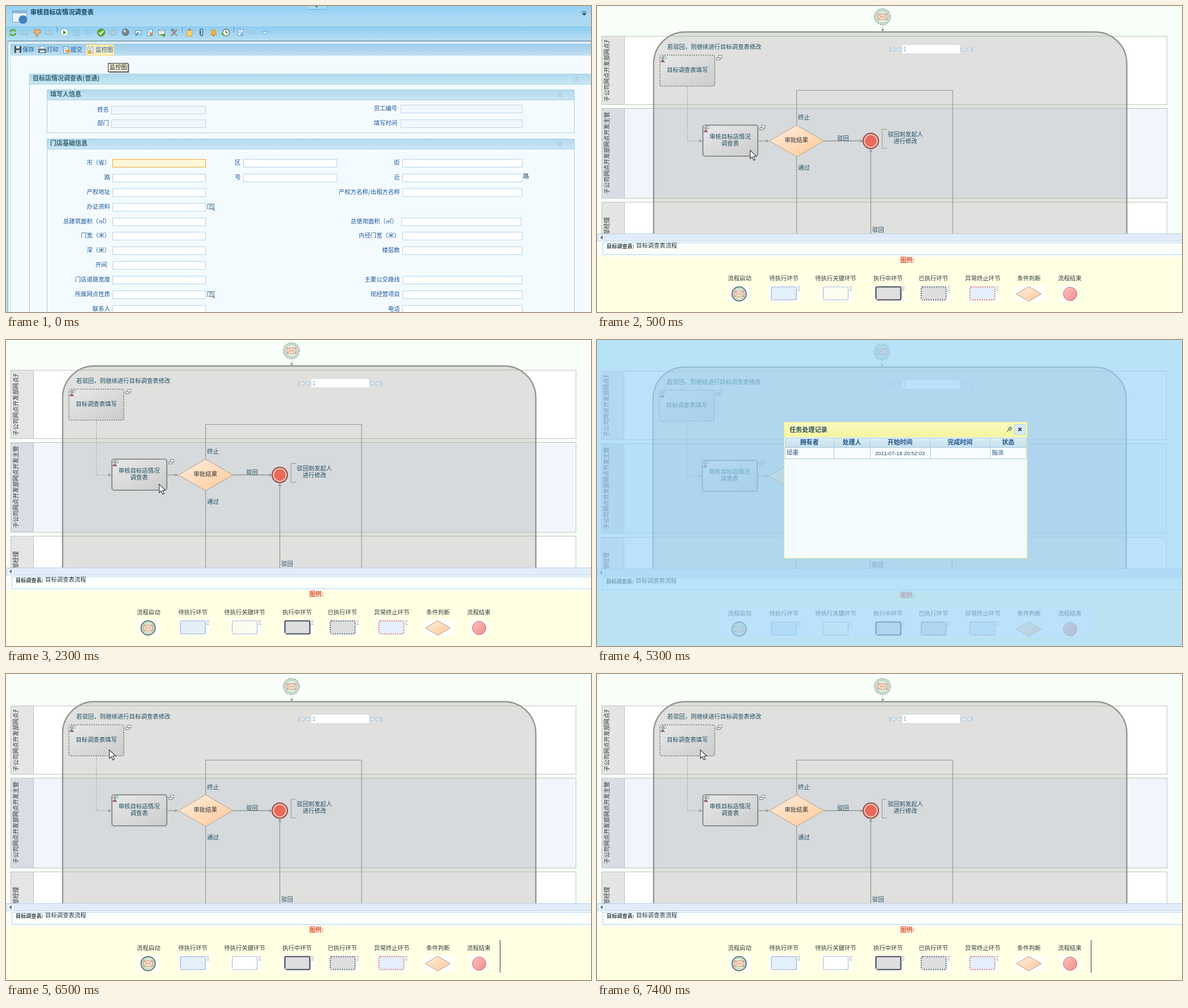
An HTML page for the animation above (8000 ms loop, 1033 px wide and 542 px high).

```html
<!DOCTYPE html>
<html lang="zh-CN">
<head>
<meta charset="utf-8">
<title>审核流程</title>
<style>
html, body { margin: 0; width: 100%; height: 100%; overflow: hidden; background: #f4fbff; }
svg { display: block; }
text { font-family: "Noto Sans CJK SC", "Noto Sans CJK", "Noto Sans CJK JP", sans-serif; font-size: 10.4px; white-space: pre; }
.arial { font-family: "Liberation Sans", Arial, sans-serif; }
</style>
</head>
<body>
<svg id="stage" width="1033" height="542" viewBox="0 0 1033 542" xmlns="http://www.w3.org/2000/svg">
<defs id="defs"></defs>
</svg>
<script>
const STAGE = document.getElementById('stage');

// Basic shapes
const rect = (x, y, w, h, fill, stroke = 'none', extra = '') =>
  `<rect x="${x}" y="${y}" width="${w}" height="${h}" fill="${fill}" stroke="${stroke}" ${extra}/>`;
const box = (x, y, w, h, fill, stroke, extra) => rect(x + .5, y + .5, w, h, fill, stroke, extra);
const path = (d, stroke, fill = 'none', w = 1, extra = '') =>
  `<path d="${d}" stroke="${stroke}" fill="${fill}" stroke-width="${w}" ${extra}/>`;
const circle = (x, y, r, fill, stroke = 'none', w = 1, extra = '') =>
  `<circle cx="${x}" cy="${y}" r="${r}" fill="${fill}" stroke="${stroke}" stroke-width="${w}" ${extra}/>`;
const group = (x, y, body) => `<g transform="translate(${x} ${y})">${body}</g>`;
// y is the middle of the line of text
const text = (s, x, y, fill = '#1d4e74', extra = '', size = 10.4) =>
  `<text x="${x}" y="${y + size * .38}" fill="${fill}" style="font-size:${size}px" ${extra}>${s}</text>`;
const bold = (s, x, y, fill, size = 11.1, extra = '') => text(s, x, y, fill, 'font-weight="700" ' + extra, size);
const END = 'text-anchor="end"', MID = 'text-anchor="middle"';
const DOTS = 'stroke-dasharray="2 2"';

const gradient = (id, stops, diagonal) =>
  `<linearGradient id="${id}" x1="0" y1="0" x2="${diagonal ? 1 : 0}" y2="1">` +
  stops.map((c, i) => `<stop offset="${i / (stops.length - 1)}" stop-color="${c}"/>`).join('') + '</linearGradient>';

document.getElementById('defs').innerHTML =
  gradient('head', ['#94d0f3', '#a6d9f5', '#aedaf2']) +
  gradient('tools', ['#8dccf0', '#b6dff3']) +
  gradient('bar', ['#9dcce8', '#c0e1f3']) +
  gradient('panel', ['#b3d9ee', '#c8e6f6']) +
  gradient('task', ['#e8e8e8', '#d9dad9', '#cbcccb'], true) +
  gradient('peach', ['#fff0e0', '#ffc797'], true) +
  gradient('pink', ['#fbc4c0', '#f28b86'], true) +
  gradient('yellow', ['#fbfac2', '#f4f49c']) +
  gradient('th', ['#dceff7', '#c6deec']);

// Form page
const page = (x, y, c = '#5a93c0') =>
  box(x - 5, y - 6, 9, 11, '#f8fcff', c) + path(`M${x - 3} ${y - 2.5}h5m-5 3h5`, c);

function toolIcons() {
  const y = 47, faint = '#8db9d2';
  const doc = (x, mark) => page(x, y) + rect(x, y, 5, 5, mark);
  const ghost = x => box(x - 6, y - 4, 9, 7, '#aad3ea', faint) + circle(x + 4, y + 3, 3, '#9fcae2');
  return path('M7.5 46a5 5 0 0 1 9-2M17 48a5 5 0 0 1-9 2', '#5ea51f', 'none', 2.4) +
    path('M17.5 40.5v5h-5zM6.5 53.5v-5h5z', 'none', '#72b82c') +
    ghost(33) + ghost(76) +
    path('M50 42h8l3 2v4h-4l-1 6h-3v-6h-4z', '#b5804a', '#f3b06a') +
    circle(103, y, 6.5, '#f5fbff', '#86a9b8') + path('M101 43l5.5 4-5.5 4z', 'none', '#45a51d') +
    circle(125, y, 5.5, 'none', faint) + path('M123.5 44.5v5m3-5v5', faint) +
    path('M142 43l5 4-5 4zM149.5 42.5v9', faint) +
    circle(168, y, 6.5, '#5fae2a', '#3f861b') + path('M164.5 47l2.5 3 5-6', '#fff', 'none', 2) +
    circle(189, y, 5.5, '#a8c8da', faint) + circle(189, y, 2, '#c5cfd8') +
    circle(211, 46.5, 6, '#7b8588', '#59656b') + circle(209.5, 44.5, 2.5, '#c4cccc') +
    box(228, 43, 10, 7, '#e7f4fd', '#4a8dc5') + path('M229 52l5-5', '#2c79bc', 'none', 2) +
    doc(254, '#d88a4c') +
    box(269, 42, 11, 8, '#f7fcff', '#7396ab') + path('M269.5 42.5l5.5 4 5.5-4', '#7396ab') +
    path('M274 50h4v-2.5l4 4-4 4v-2.5h-4z', 'none', '#53a52b') +
    path('M292 42l10 11', '#8c98a0', 'none', 2.2) + path('M302 42l-10 11', '#c1684a', 'none', 2) +
    path('M291 43l4-2 2 3', '#6f7e88', 'none', 2) +
    box(319, 42, 9, 11, '#fbd06a', '#d2a140') + rect(322, 40, 4, 4, '#7d9aae') +
    path('M343.5 44v7a2 2 0 0 0 4 0v-8a2.5 2.5 0 0 0-5 0v8', '#4d5a62', 'none', 1.2) +
    path('M361 51l2-3v-3a3.5 3.5 0 0 1 7 0v3l2 3z', '#d98b1e', '#fbb23c') + circle(366.5, 52.5, 1.5, '#c67818') +
    circle(388.5, y, 6, '#f3f8ea', '#5f7f68', 1.5) + path('M388.5 43.5v4h3', '#444', 'none', 1.2) +
    path('M381 48l4 4', '#60a72c', 'none', 2.5) +
    doc(414, '#88b6da') +
    path('M430 49l6-5 6 5z', '#8dbfe0', '#a4d2ee') + path('M452 45h11l-5.5 6z', '#5e9ccc', '#d3ecfb') +
    [90, 311, 402].map(x => path(`M${x + .5} 37v10`, '#5f91ad')).join('');
}

function formPage() {
  const ink = '#1c57a0';
  const fieldLook = {
    on: ['#fff', '#b3d3ec'],
    off: ['#f1f8fe', '#bcd2e8'],
    focus: ['#fff6d6', '#eaa43c']
  };
  const field = (x, y, w, look = 'on') => box(x, y, w, 14, ...fieldLook[look]);
  const chevron = (x, y) => path(`M${x - 4} ${y}l4-4 4 4m-8 4l4-4 4 4`, '#a2adb5');
  const panel = (x, y, w, h, title, chX) =>
    box(x, y, w, h, '#f4fbff', '#a6cfe6') + rect(x + 1, y + 1, w - 1, 17, 'url(#panel)') +
    path(`M${x} ${y + 18.5}h${w}`, '#a6cfe6') +
    bold(title, x + 6, y + 8, '#39636f', 11) + chevron(chX, y + 10);
  const lens = (x, y) => box(x, y, 12, 9, '#f5fbff', '#7297b2') + rect(x, y, 13, 2.5, '#88aac4') +
    circle(x + 7.5, y + 6.5, 3, '#d8eefb', '#496f8b') + path(`M${x + 10} ${y + 9}l3.5 3.5`, '#496f8b', 'none', 1.6);

  const rows = [
    ['市（省）', '街'], ['路', '近'], ['产权地址', '产权方名称/出租方名称'], ['办证资料', ''],
    ['总建筑面积（㎡）', '总使用面积（㎡）'], ['门宽（米）', '内径门宽（米）'], ['深（米）', '楼层数'],
    ['开间', ''], ['门店道路宽度', '主要公交路线'], ['所属网点性质', '现经营项目'], ['联系人', '电话']
  ];
  let s = rect(0, 0, 1033, 542, '#f4fbff') + rect(0, 0, 1033, 36, 'url(#head)') +
    rect(0, 36, 1033, 25, 'url(#tools)') +
    rect(0, 61, 1033, 2, '#84a7b8') + rect(0, 63, 1033, 4, '#d9edf7') +
    rect(0, 61, 4, 481, '#b1daef') + path('M3.5 62v480', '#8eb0c1') + path('M7.5 67v475', '#c4e0ee') +
    rect(8, 67, 1025, 21, 'url(#bar)') +
    path('M530 0v4q0 2 2 2h33q2 0 2-2v-4', '#61afe0', '#a9daf5') + path('M546 0h5l-2.5 3z', 'none', '#456f88') +
    path('M1016.5 10.5h8', '#20384a') + path('M1017 13h8l-4 4z', 'none', '#20384a') +
    box(11, 8, 25, 20, '#e9f5fc', '#79a6c6') + rect(12, 9, 24, 4, '#8cb9dc') + circle(30, 24, 7.5, '#3f83bd') +
    bold('审核目标店情况调查表', 43, 11, '#173f5f', 11.2) + toolIcons();

  s += box(15, 71, 11, 11, '#4a5964', '#35434d') + rect(18, 71, 6, 4, '#e5edf2') + rect(18, 78, 6, 5, '#cbd8e0') +
    text('保存', 29, 77, ink) +
    rect(60, 71, 8, 5, '#fff', '#7890a0') + box(57, 76, 13, 6, '#71818d', '#4e606d') + rect(60, 79, 8, 3, '#e7f1f7') +
    text('打印', 72, 77, ink) +
    page(106, 78) + path('M105 78h4v-3l5 5-5 5v-3h-4z', 'none', '#f09a3b') + text('提交', 114, 77, ink) +
    box(141, 68, 49, 19, '#feeebb', '#f4d684') + page(149, 78, '#6ea0c2') + rect(144, 79, 7, 4, '#f0b252') +
    text('监控图', 158, 77, ink);

  s += panel(41, 120, 1000, 440, '目标店情况调查表(普通)', 1008) +
    panel(72, 148, 931, 76, '填写人信息', 978) + panel(72, 235, 931, 330, '门店基础信息', 978);
  s += text('姓名', 182, 183, ink, END) + field(186, 177, 166, 'off') +
    text('部门', 182, 207.5, ink, END) + field(186, 201, 166, 'off') +
    text('员工编号', 691, 181.5, ink, END) + field(697, 175, 214, 'off') +
    text('填写时间', 691, 207.5, ink, END) + field(697, 201, 214, 'off');

  rows.forEach(([left, right], i) => {
    const y = Math.round(271.3 + i * 25.82), nudge = i === 4 ? 2 : 0;
    s += text(left, i === 7 ? 178.5 : 184, y + 6, ink, END) + field(188, y, 164, i ? 'on' : 'focus');
    if (right) s += text(right, 695.5 - nudge * 2, y + 6, ink, END) + field(700 - nudge, y, 211);
    if (i < 2) s += text('区号'[i], 414.5, y + 6, ink, END) + field(419, y, 165);
    if (i === 3 || i === 9) s += lens(355, y + 1);
  });
  return s + text('路', 913, 301, '#173f5f') +
    rect(182, 103, 36, 16, '#a9b7bd') + box(180, 101, 35, 15, '#ffffe6', '#222') + text('监控图', 182.5, 108.5, '#111');
}

// Flow chart
const envelope = (x, y) => rect(x - 8, y - 5, 16, 10, '#f6e3cd', '#cf8b70') +
  path(`M${x - 8} ${y - 5}l8 6 8-6m-16 10l6-5.5m10 5.5l-6-5.5`, '#cf8b70');
const diamond = (x, y, w, h) => path(`M${x - w} ${y}L${x} ${y - h}L${x + w} ${y}L${x} ${y + h}z`, '#ad9c88', 'url(#peach)');

function flowTop() {
  const line = '#939893', ink = '#1d4e62';
  const lane = (y, h, fill, head) => box(8, y, 998, h, fill, '#bcc4b8') + box(8, y, 40, h, head, '#bcc4b8');
  const upward = (s, y, extra = '') => `<g transform="translate(17 ${y}) rotate(-90)">${text(s, 0, 0, '#333', extra)}</g>`;
  const task = (x, y, dotted) =>
    rect(x, y, 97, 55, 'url(#task)', '#8d918d', `rx="4" stroke-width="2.2" ${dotted ? DOTS : ''}`) +
    rect(x + 2, y + 1, 10, 10, '#f1f4f4') + path(`M${x + 5} ${y + 2}h6v5h-4`, '#6aa3d2', '#d8ecfa') +
    circle(x + 5, y + 5, 2.2, '#f0c3a0', '#5b4a40', .8) + path(`M${x + 1.5} ${y + 12}q3.5-7 7 0z`, '#b9483f', '#4e82b2') +
    box(x + 103, y, 6, 5, '#eef3f3', '#7e8a8a') + box(x + 100, y + 4, 6, 4, '#dde6e8', '#7e8a8a');
  const arrow = (x, y, turn = 0) =>
    `<path transform="translate(${x} ${y}) rotate(${turn})" d="M0 0l-6-3 1.5 3-1.5 3z" fill="${line}"/>`;
  const step = (x, dir) =>
    path(`M${x} 75h${dir * 3}v-2l${dir * 5} 4 ${dir * -5} 4v-2h${dir * -3}z`, '#a5c8e2', '#e3eef3');

  return `<svg width="1040" height="403" overflow="hidden">` +
    lane(53, 121, '#fff', '#e5e5e5') + lane(181, 159, '#f0f6fb', '#d9dee6') + lane(347, 120, '#fff', '#e5e5e5') +
    `<svg y="60" width="48" height="343" overflow="hidden">` +
    group(0, -60, upward('子公司网点开发部网点开', 169.5) + upward('子公司网点开发部网点开发主管', 333) + upward('部经理', 374, END)) +
    '</svg>' +
    rect(100, 46, 835.5, 600, 'rgba(165,165,160,.35)', '#929792', 'rx="56" stroke-width="2.4"') +
    circle(504, 19, 14, '#d3e9dc', '#84a093', 2, DOTS) + circle(504, 19, 11, '#e1eee0', '#a6beb0') + envelope(504, 19) +
    path('M504.5 33v9', line, 'none', 1, DOTS) + arrow(504.5, 46, 90) +
    text('若驳回，则继续进行目标调查表修改', 124, 72, ink) +
    step(527.5, -1) + step(537, -1) + step(643.5, 1) + step(653, 1) +
    path('M517.5 72v10M662.5 72v10', '#9bb4c4') +
    box(538, 68, 103, 16, '#fff', '#d0dde2') + text('1', 541, 76.5, '#a0a0a0', 'class="arial"', 10) +
    task(111, 87, true) + text('目标调查表填写', 159.5, 113, ink, MID) +
    path('M159.5 143v96h22', line, 'none', 1, DOTS) + arrow(186, 239) +
    task(187, 211) + text('审核目标店情况', 235, 231, ink, MID) + text('调查表', 235, 243, ink, MID) +
    path('M285 239h16', line, 'none', 1.3) + arrow(304, 239) +
    path('M352.5 211v-61.5h275.5v260M352.5 266v140', line, 'none', 1.2) +
    diamond(352.5, 239, 48, 28) + text('审批结果', 352, 237, '#333', MID) +
    path('M401 239h65', line, 'none', 1.3) + arrow(470, 239) +
    path('M483.5 406v-150', line, 'none', 1.3) + arrow(483.5, 253, -90) +
    circle(483.5, 239, 13.5, '#f9bdb0', '#8f4a46', 2) + circle(483.5, 239, 9.5, '#ea6a5c', '#d8564c') +
    path('M512 218.5h-8.5v33.5h8.5', '#8a9690') +
    text('驳回到发起人', 544.5, 227, ink, MID) + text('进行修改', 544.5, 239, ink, MID) +
    text('驳回', 424, 234, ink) + text('终止', 355, 197, ink) + text('通过', 355, 286, ink) + text('驳回', 486, 396, ink) +
    '</svg>' +
    rect(0, 403, 1040, 14, '#e1ecfa') + path('M0 403.5h1040M0 416.5h1040', '#bad2e8') +
    box(1, 404, 13, 12, '#eef5fd', '#c5d8ec') + path('M10 406v8l-4.5-4z', 'none', '#5580a4') +
    box(10, 419, 1040, 21, '#fbfffc', '#b7d1ea') +
    bold('目标调查表:', 17, 425.5, '#32424a', 9.2) + text('目标调查表流程', 69, 424.5, '#1f3444');
}

function legend(strip, whiteKey) {
  const labels = [['流程启动', 231], ['待执行环节', 304], ['待执行关键环节', 385], ['执行中环节', 488],
    ['已执行环节', 568], ['异常终止环节', 650], ['条件判断', 742], ['流程结束', 814]];
  const patch = (x, w) => rect(x, 495, w, 29, '#fffffa');
  const tile = (x, fill, stroke, w = 1.2, extra = '') =>
    patch(x - 4, 56) + rect(x, 497.5, 44, 23, fill, stroke, `rx="2" stroke-width="${w}" ${extra}`) +
    path(`M${x + 46} 497.5h5m-4 3h3m-4 3h5`, '#9aa0a0') + circle(x, 520.5, 2, '#fbe3cc');
  return rect(0, 444, 1033, 110, '#ffffe4') + (strip ? rect(216, 472, 656, 54, '#fff') : '') +
    bold('图例:', 548, 449.5, '#e4523c', 10.8, MID) +
    labels.map(([s, x]) => text(s, x, 482, '#333f38')).join('') +
    patch(233, 37) + circle(251, 510, 12.5, '#d6e8d6', '#5d7770', 2) +
    circle(251, 510, 9.5, '#e3edd8', '#b5c5b5') + envelope(251, 510) +
    tile(308, '#e4effc', '#8fb0d6') + tile(399.5, whiteKey ? '#fff' : '#fcfcf0', '#a9bfd2') +
    tile(492.5, '#dedede', '#474f52', 2.2) + tile(572.5, '#dedede', '#56646c', 2, DOTS) +
    tile(658.5, '#e4effc', '#e4706c', 2, DOTS) +
    patch(738, 54) + diamond(762.5, 510, 22, 13) +
    patch(820, 30) + circle(835.5, 510, 12, 'url(#pink)', '#bd7a76');
}

const flow = (dx, dy, strip, whiteKey) => rect(0, 0, 1033, 542, '#f8fff9') +
  group(0, dy, legend(strip, whiteKey)) + group(dx, dy, flowTop());
const cursor = (x, y) => group(x, y, path('M.5.5v15l3.5-3.2 2.6 6 2.6-1.1-2.6-6h5z', '#333', '#fff', 1.1));

function dialog() {
  const ink = '#1f4a72';
  const cols = [332, 418, 482, 588, 694, 758];
  const heads = ['拥有者', '处理人', '开始时间', '完成时间', '状态'];
  let s = rect(0, 0, 1033, 542, 'rgba(152,212,247,.66)') +
    box(330, 145, 429, 241, '#f4fcff', '#efe98c') + rect(331, 146, 428, 26, 'url(#yellow)') +
    bold('任务处理记录', 340, 158.5, '#2b4d66') +
    path('M723.5 162.5l4-4m-2-2.5l5 5m-3.5-5l3-2 2.5 2.5-2 3', '#5e7d92', '#a9c0cf', 1.2) +
    box(737, 149, 19, 18, '#d5ebf5', '#b7d5e5') + path('M744 155.5l5.5 5.5m0-5.5l-5.5 5.5', '#2c3d48', 'none', 1.8) +
    rect(332, 173, 426, 18, 'url(#th)') + rect(332, 191, 426, 19, '#f8fdff');
  heads.forEach((h, i) => {
    const x = cols[i], w = cols[i + 1] - x;
    s += box(x, 173, w, 17, 'none', '#a9cee4') + box(x, 190, w, 20, 'none', '#a9cee4') +
      bold(h, x + w / 2, 181, '#1f5288', 11, MID);
  });
  return s + text('邱墨', 335, 199, ink) + text('指派', 697, 199, ink) +
    text('2011-07-18 20:52:03', 535, 200.5, ink, MID + ' class="arial"', 9.5);
}

// Start time of each scene in ms
const scenes = [
  [0, formPage()],
  [500, flow(0, 0) + cursor(270, 255)],
  [3500, flow(-1, 2, true) + dialog()],
  [6500, flow(0, 3, false, true) + path('M872.5 471v58', '#2c3a48') + cursor(182, 134)]
];
const LOOP = 8000;
STAGE.insertAdjacentHTML('beforeend', scenes.map(([, body]) => `<g display="none">${body}</g>`).join(''));
const layers = [...STAGE.querySelectorAll(':scope > g')];

const start = performance.now();
let shown = -1;
function tick() {
  const t = (performance.now() - start) % LOOP;
  const now = scenes.filter(([from]) => from <= t).length - 1;
  if (now !== shown) {
    layers.forEach((g, i) => g.setAttribute('display', i === now ? 'inline' : 'none'));
    shown = now;
  }
  requestAnimationFrame(tick);
}
tick();
</script>
</body>
</html>
```
